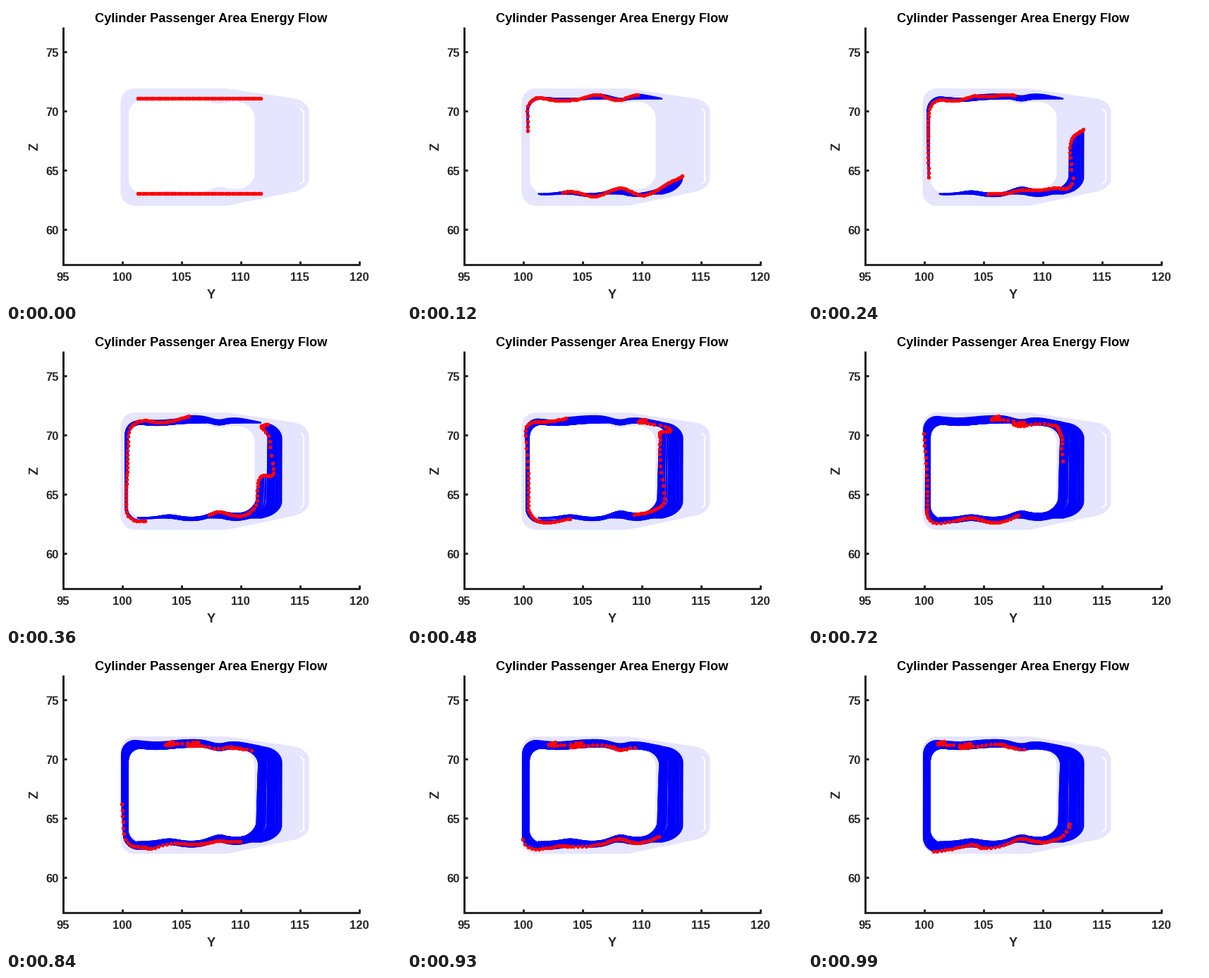
Animation, 560 px wide and 420 px high, one loop 1.02 s. Source, as a matplotlib script:

```python
import numpy as np
import matplotlib.pyplot as plt
from matplotlib.animation import FuncAnimation
from matplotlib.collections import LineCollection

W, H, DPI = 560, 420, 100
PX = 72 / DPI
UNIT = 16.8                   # pixels per axis unit
FRAMES, INTERVAL = 34, 30
SUB = 4                       # trail samples per frame
SPEED_X, SPEED_Y = 8.5, 16.5  # pixels per frame
DRIFT = 0.7
RADIUS, STRAIGHT = 20, 0.7    # corner size, straight share of each side
INK, PALE, BLUE, RED = "#262626", "#e5e5ff", "#0000ff", "#ff0000"


def inward(x, lower, wave, slope):
    """How far the lower or upper wall is pressed in at x."""
    def bump(height, centre, width):
        return height * np.exp(-((x - centre) / width) ** 2)

    low = bump(9, 303, 20) + bump(3.5, 231, 17)
    high = bump(6, 302, 18) + bump(3.5, 213, 30)
    taper = np.maximum(x - 313, 0) * np.where(lower, 0.28, 0.2)
    return wave * np.where(lower, low, high) + slope * taper


def ring(q, left, right, top, bottom, wave=1, slope=1):
    """Rounded box, one side per unit of q: bottom, right, top, left."""
    side = np.floor(q).astype(int) % 4
    t = q % 1
    u = np.minimum(t / STRAIGHT, 1)
    turn = np.maximum(t - STRAIGHT, 0) / (1 - STRAIGHT)

    def corner(k):
        return (np.where(k % 4 < 2, right - RADIUS, left + RADIUS),
                np.where((k + 1) % 4 < 2, bottom - RADIUS, top + RADIUS))

    (x0, y0), (x1, y1) = corner(side - 1), corner(side)
    angle = np.pi / 2 * (1 - side - turn)
    x = x0 + u * (x1 - x0) + RADIUS * np.cos(angle)
    y = y0 + u * (y1 - y0) + RADIUS * np.sin(angle)
    h = (2 * y - top - bottom) / (bottom - top)
    return x, y - h * inward(x, h > 0, wave, slope)


def stream(q, depth):
    return ring(q, 173 - 10 * depth, 354 + 40 * depth,
                131.5 - 11 * depth, 266 + 15 * depth)


def find_start(xs, y, side, direction):
    """Relax q and depth until the streamlines pass through (xs, y)."""
    q, depth = np.full_like(xs, side + 0.35), np.full_like(xs, 0.5)
    for _ in range(150):
        px, py = stream(q, depth)
        q = np.clip(q + direction * (xs - px) / 300, side - 0.25, side + 0.85)
        depth = np.clip(depth + direction * (y - py) / 20, -0.1, 1.2)
    return zip(q, depth)


def trace(q0, depth):
    """Positions of one particle, SUB per frame, slowly drifting outward."""
    part = np.linspace(0, 0.85, 700)
    path = np.array(stream(q0 + 4 * part,
                           depth + DRIFT * part ** 2 * (1.05 - depth)))
    dx, dy = np.diff(path)
    clock = np.append(0, np.cumsum(np.hypot(dx / SPEED_X, dy / SPEED_Y)))
    times = np.arange((FRAMES - 1) * SUB + 1) / SUB
    return np.column_stack([np.interp(times, clock, axis) for axis in path])


start_x = np.linspace(186.3, 360.5, 53)
seeds = [*find_start(start_x, 131, 2, -1), *find_start(start_x, 266, 0, 1)]
tracks = np.array([trace(q, depth) for q, depth in seeds])

fig = plt.figure(figsize=(W / DPI, H / DPI), dpi=DPI, facecolor="white")
ax = fig.add_axes([0, 0, 1, 1])
ax.set(xlim=(-0.5, W - 0.5), ylim=(H - 0.5, -0.5))
ax.axis("off")


def label(x, y, text, size, **kw):
    ax.text(x, y, text, size=size * PX, weight="bold",
            family="Liberation Sans", **{"ha": "center", "color": INK, **kw})


def stroke(xs, ys, color=INK, width=3):
    ax.plot(xs, ys, color=color, lw=width * PX, solid_capstyle="butt",
            solid_joinstyle="miter")


label(290, 23, "Cylinder Passenger Area Energy Flow", 18.25, color="black")
label(290, 415, "Y", 18.25)
label(40.5, 198.5, "Z", 18.25, rotation=90, va="center")
for value in range(95, 121, 5):
    x = 80 + (value - 95) * UNIT
    stroke([x, x], [367, 362])
    label(x, 390, str(value), 16.6)
for value in range(60, 76, 5):
    y = 317 - (value - 60) * UNIT
    stroke([80, 85], [y, y])
    label(74, y + 6.5, str(value), 16.6, ha="right")
stroke([80, 80, 501], [30, 367, 367])

around = np.linspace(0, 4, 600)
ax.fill(*ring(around, 162, 429, 116.5, 283, wave=0, slope=0.75),
        color=PALE, lw=0)
ax.fill(*stream(around, -0.05), color="white", lw=0)
stroke([417, 421.5, 421.5, 416], [145, 150, 248, 252], "white", 2)

trails = LineCollection([], colors=BLUE, linewidths=2.8 * PX,
                        capstyle="round", zorder=3)
ax.add_collection(trails)
dots, = ax.plot([], [], "o", color=RED, ms=5.6 * PX, mew=0, zorder=4)


def update(n):
    now = n * SUB
    trails.set_segments(list(tracks[:, :now + 1]) if n else [])
    dots.set_data(*tracks[:, now].T)
    return trails, dots


anim = FuncAnimation(fig, update, frames=FRAMES, interval=INTERVAL,
                     repeat=True, repeat_delay=0)
plt.show()
```
